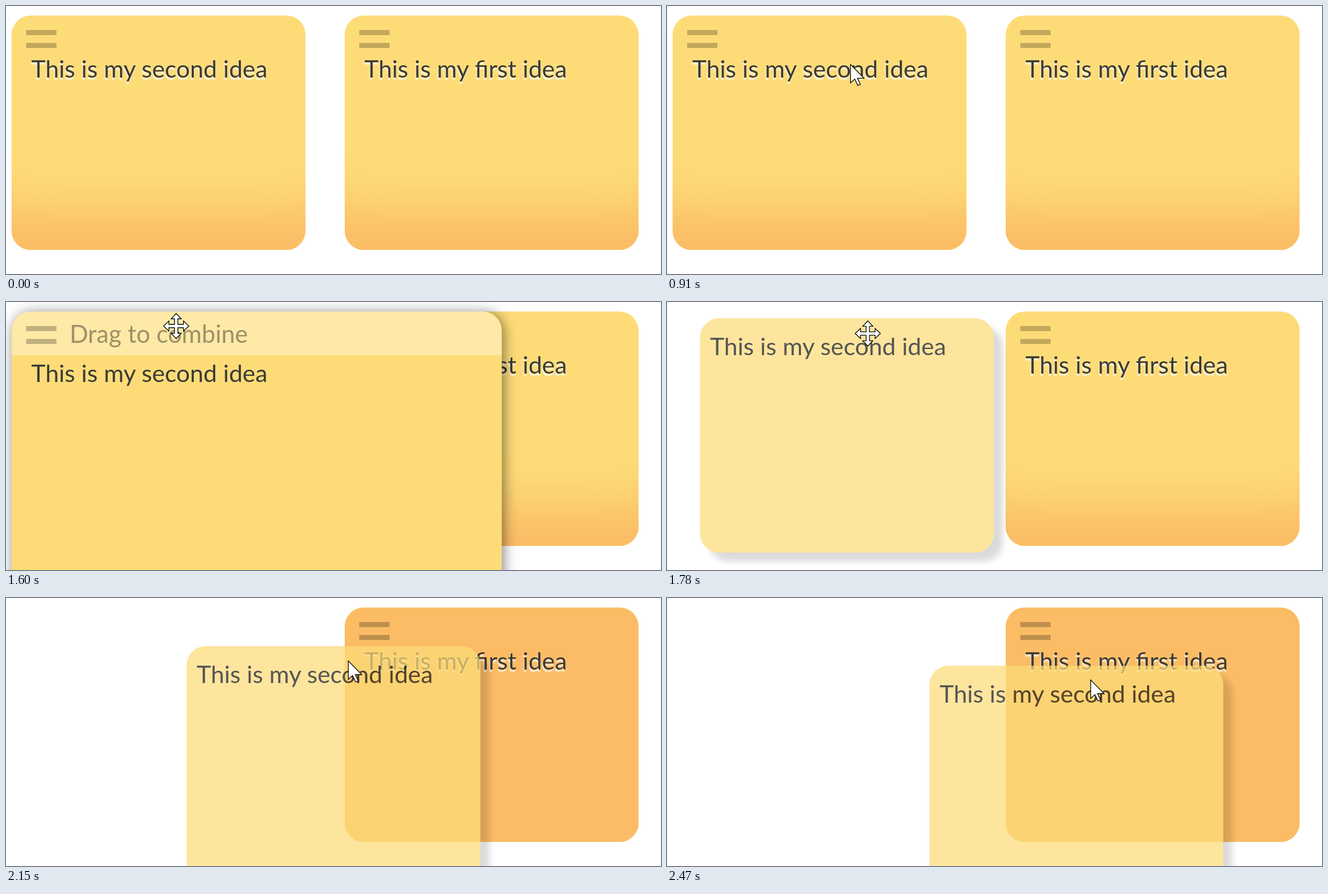
An HTML page that plays this animation: 1168 by 479 pixels, repeating every 3000 ms.

```html
<!DOCTYPE html>
<html lang="en">
<head>
<meta charset="utf-8">
<title>Drag to combine</title>
<style>
  html, body { margin: 0; width: 100%; height: 100%; overflow: hidden; background: #fff; }
  #stage { position: relative; width: 1168px; height: 479px; overflow: hidden; background: #fff;
    font: 43.2px/1 Lato, sans-serif; color: #3b3a36; }
  #stage div, #stage svg { position: absolute; }
  .card { left: 10px; top: 17px; width: 524px; height: 419px; border-radius: 34px;
    background: #fddc78; overflow: hidden; }
  #first { left: 604px; }
  .text { left: 35px; top: 73px; white-space: nowrap; text-shadow: -1px 4px 2px rgba(255, 255, 255, .75); }
  .bar { left: 26px; width: 54px; height: 9px; background: rgba(0, 0, 0, .24); }
  .bar.one { top: 26px; }
  .bar.two { top: 48.5px; }
  #header { left: 0; top: 0; width: 100%; background: rgba(255, 255, 255, .35); }
  #label { left: 103.5px; top: 18px; white-space: nowrap; font-size: 43.5px; color: rgba(0, 0, 0, .38); }
  #ghost { opacity: .72; box-shadow: 16px 16px 12px rgba(0, 0, 0, .2); }
  #ghost .text { left: 18px; top: 28px; color: #141414; text-shadow: none; }
  svg { left: 0; top: 0; }
  path { fill: #fff; stroke: #000; stroke-width: 1.3; }
</style>
</head>
<body>
<div id="stage">
  <div class="card" id="first">
    <div class="bar one"></div><div class="bar two"></div>
    <div class="text">This is my first idea</div>
  </div>
  <div class="card" id="second">
    <div id="header"><div id="label">Drag to combine</div></div>
    <div class="bar one"></div><div class="bar two"></div>
    <div class="text" id="idea">This is my second idea</div>
  </div>
  <div class="card" id="ghost"><div class="text">This is my second idea</div></div>
  <svg width="1168" height="479">
    <path id="arrow" d="M.5 .5V33.5L8 26.5L13.5 38L18 36L12.8 25H24.5Z"/>
    <path id="move"/>
  </svg>
</div>
<script>
const LOOP = 3000;
const ORANGE = '#fbbc65';
const STEPS = [0, 680, 760, 840, 910, 990, 1060, 1140, 1230, 1600, 1690, 1770, 1840,
  1920, 2010, 2070, 2150, 2230, 2310, 2390, 2470];
const DRAG = [1600, 1920, 2150, 2470];
const POINTER_X = [303, 446, 610, 755], POINTER_Y = [43, 77, 112, 146];
const GHOST_X = [10, 143, 322, 468], GHOST_Y = [17, 48, 86, 121];

const el = id => document.getElementById(id);
const [first, second, header, label, idea, ghost, arrow, move] =
  ['first', 'second', 'header', 'label', 'idea', 'ghost', 'arrow', 'move'].map(el);

const clamp = u => Math.max(0, Math.min(1, u));
const smooth = u => u * u * (3 - 2 * u);
const mix = (a, b, u) => a + (b - a) * u;
const phase = (t, start, length) => clamp((t - start) / length);
const show = (node, on) => { node.style.display = on ? '' : 'none'; };

// Smooth curve through the drag points, at rest at both ends.
function along(values, t) {
  const last = DRAG.length - 1;
  const slope = i => i === 0 || i === last ? 0
    : (values[i + 1] - values[i - 1]) / (DRAG[i + 1] - DRAG[i - 1]);
  let i = 0;
  while (i < last - 1 && t >= DRAG[i + 1]) i++;
  const span = DRAG[i + 1] - DRAG[i];
  const u = phase(t, DRAG[i], span), v = 1 - u;
  return mix(values[i], values[i + 1], smooth(u))
    + span * (u * v * v * slope(i) - u * u * v * slope(i + 1));
}

// Four-way cursor: one arm turned by quarter steps.
const arm = [[-3, -3], [-3, -13], [-9, -13], [0, -22.5], [9, -13], [3, -13]];
const points = [];
for (let q = 0; q < 4; q++)
  for (let [x, y] of arm) {
    for (let k = 0; k < q; k++) [x, y] = [-y, x];
    points.push((x + 0.5) + ' ' + y);
  }
move.setAttribute('d', 'M' + points.join('L') + 'Z');

const glow = alpha => `inset 0 -157px 87px -87px rgba(251, 188, 101, ${alpha})`;

function pointer(t) {
  const dragging = t >= 1600;
  const u = phase(t, 680, 380), out = 1 - (1 - u) * (1 - u);
  const x = dragging ? along(POINTER_X, t) : mix(472, 300, out);
  const y = dragging ? along(POINTER_Y, t) : mix(435, 43, out);
  const cross = t >= 990 && t < 2010;
  show(arrow, t >= 680 && !cross);
  show(move, cross);
  (cross ? move : arrow).setAttribute('transform', `translate(${x} ${y})`);
}

function draw(t) {
  const grow = smooth(phase(t, 932.5, 220));
  const open = t >= 1140;
  show(second, t < 1690);
  show(header, grow > 0);
  second.style.width = mix(524, 873.5, grow) + 'px';
  second.style.height = mix(419, 720, grow) + 'px';
  second.style.boxShadow = `${glow(1 - grow)}, ${3 * grow}px ${3 * grow}px ${24 * grow}px rgba(0, 0, 0, ${0.5 * grow})`;
  header.style.height = (open ? 78 : 63) + 'px';
  label.style.opacity = clamp(grow * 2);
  idea.style.top = (open ? 88 : 73) + 'px';
  idea.style.textShadow = grow > 0 ? 'none' : '';

  const fill = 262 * smooth(phase(t, 1892, 200));
  first.style.boxShadow = `inset 0 0 0 ${fill}px ${ORANGE}, ${glow(1)}`;

  show(ghost, t >= 1690);
  ghost.style.left = along(GHOST_X, t) + 'px';
  ghost.style.top = along(GHOST_Y, t) + 'px';
  pointer(t);
}

// The motion is shown at a low, uneven rate: hold the latest step.
function tick() {
  const t = performance.now() % LOOP;
  draw(STEPS.filter(s => s <= t).pop());
  requestAnimationFrame(tick);
}
tick();
</script>
</body>
</html>
```
